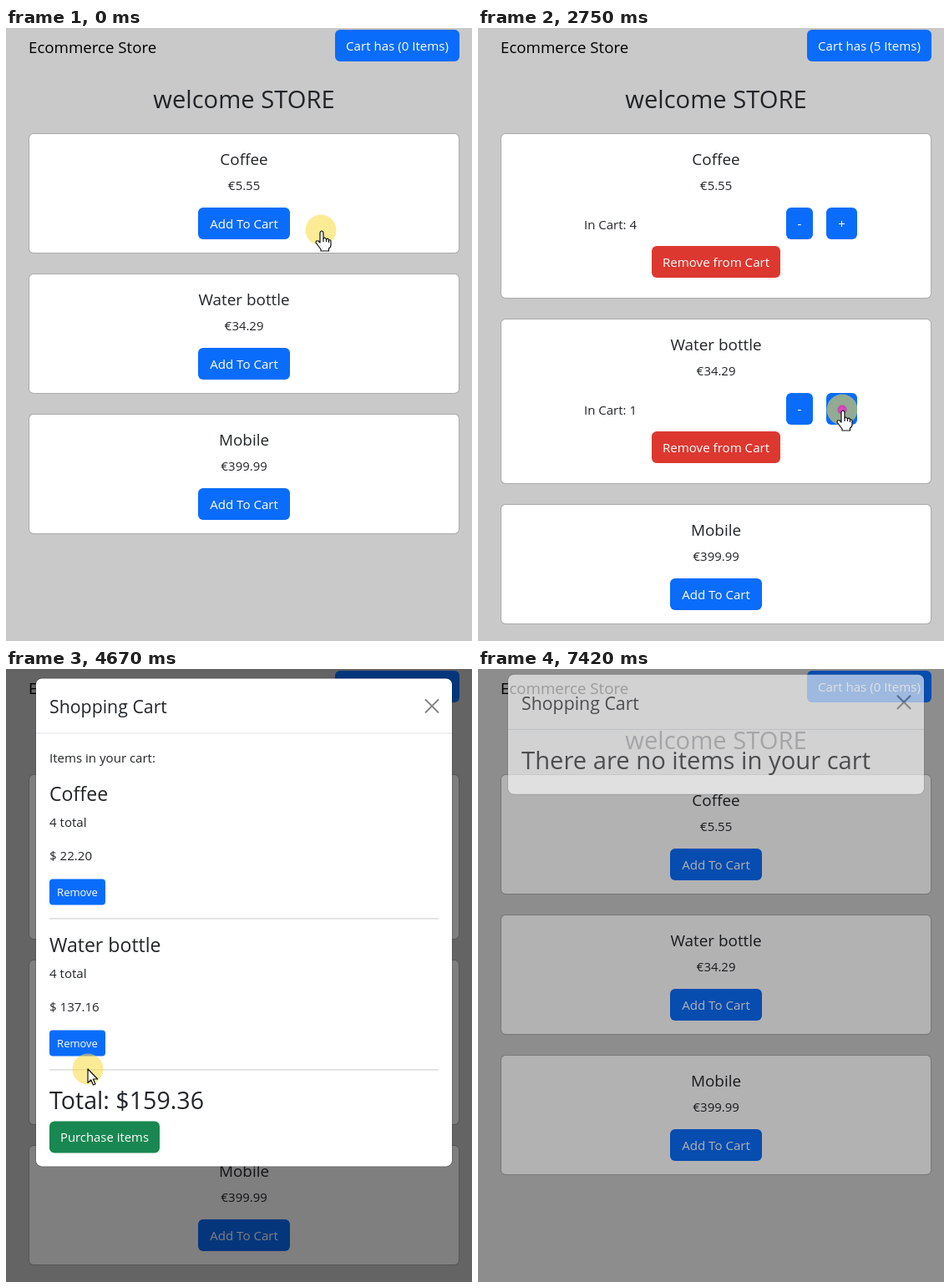
An HTML page with a canvas that plays this animation: 558 px wide and 734 px high, repeating every 7460 ms.

```html
<!DOCTYPE html>
<html lang="en">
<head>
<meta charset="utf-8">
<title>Ecommerce Store</title>
<style>
html, body { margin: 0; width: 100%; height: 100%; overflow: hidden; background: #c9c9c9; }
canvas { display: block; }
</style>
</head>
<body>
<canvas id="stage" width="558" height="734"></canvas>
<script>
const W = 558, H = 734, LOOP = 7460;
const stage = document.getElementById('stage');
const page = stage.getContext('2d');
const layer = document.createElement('canvas');
layer.width = W;
layer.height = H;
const modal = layer.getContext('2d');

const BG = '#c9c9c9', PANEL = '#fff', EDGE = 'rgba(0, 0, 0, .15)';
const INK = '#212529', TITLE = '#000', LABEL = '#fff';
const BLUE = '#0a6cfa', PRESSED = '#0a5dc4', RED = '#dc3830', GREEN = '#198751';
const RULE = '#c8c9ca', LINE = '#dee2e6', CLOSE = '#7f7f7f';

const PRODUCTS = [
  { name: 'Coffee', price: 5.55 },
  { name: 'Water bottle', price: 34.29 },
  { name: 'Mobile', price: 399.99 }
];

// time, coffee count, water count
const CART = [
  [0, 0, 0], [510, 1, 0], [1170, 2, 0], [1540, 3, 0], [1980, 4, 0],
  [2400, 4, 1], [2940, 4, 2], [3320, 4, 3], [3700, 4, 4],
  [5900, 0, 4], [6450, 0, 0]
];

// time, x, y of the pointer
const PATH = [
  [0, 377, 242], [260, 300, 238], [580, 300, 238], [860, 436, 236],
  [1700, 436, 236], [1880, 410, 401], [2100, 312, 456], [2330, 312, 456],
  [2580, 436, 457], [3560, 436, 457], [3750, 465, 44], [3880, 462, 26],
  [4250, 462, 26], [4670, 98, 479], [5150, 91, 273], [5700, 91, 273],
  [6020, 88, 274], [6330, 88, 274], [6840, 148, 510], [7150, 205, 770]
];
const CLICKS = [330, 980, 1340, 1690, 2210, 2740, 3120, 3560, 4150, 5590, 6200];
const HAND_SPANS = [[0, 1800], [2200, 2420], [2700, 3650], [3960, 4400], [5720, 6480]];
const OPEN_AT = 4490, CLOSE_AT = 7362, SLIDE = 300, FADE = 150;

const clamp = v => Math.min(1, Math.max(0, v));
const within = (t, a, b) => t >= a && t < b;

// cubic-bezier(0, 0, .58, 1)
function easeOut(p) {
  let lo = 0, hi = 1;
  for (let i = 0; i < 20; i++) {
    const u = (lo + hi) / 2;
    const x = 1.74 * u * u * (1 - u) + u * u * u;
    if (x < p) lo = u; else hi = u;
  }
  return lo * lo * (3 - 2 * lo);
}

function box(c, x, y, w, h, r, fill) {
  c.fillStyle = fill;
  c.beginPath();
  c.roundRect(x, y, w, h, r);
  c.fill();
}

function panel(c, x, y, w, h, r) {
  box(c, x - 1, y - 1, w + 2, h + 2, r + 1, EDGE);
  box(c, x, y, w, h, r, PANEL);
}

function text(c, str, x, y, size, fill = INK, align = 'left') {
  c.font = `${size}px "Open Sans", "Noto Sans", sans-serif`;
  c.textAlign = align;
  c.fillStyle = fill;
  c.fillText(str, x, y);
}

function button(c, label, x, y, w, fill, h = 38, size = 15.1) {
  box(c, x, y, w, h, h > 35 ? 6 : 4, fill);
  text(c, label, x + w / 2, Math.round(y + h / 2 + size * .43), size, LABEL, 'center');
}

function drawCard(product, y, count, state) {
  const h = count ? 196 : 142;
  panel(page, 28, y, 514, h, 5);
  text(page, product.name, 285, y + 37, 18.9, INK, 'center');
  text(page, '€' + product.price, 285, y + 67, 14.9, INK, 'center');
  if (count) {
    text(page, 'In Cart: ' + count, 127, y + 114, 15);
    button(page, '-', 369, y + 88, 32, BLUE);
    button(page, '+', 417, y + 88, 37, state.plus ? PRESSED : BLUE);
    button(page, 'Remove from Cart', 208, y + 134, 154, RED);
  } else {
    button(page, 'Add To Cart', 230, y + 88, 110, state.add ? PRESSED : BLUE);
  }
  return y + h + 26;
}

function drawPage(t, counts) {
  page.fillStyle = BG;
  page.fillRect(0, 0, W, H);
  text(page, 'Ecommerce Store', 27, 30, 18.7, TITLE);
  const cartHover = within(t, 3980, OPEN_AT);
  button(page, `Cart has (${counts[0] + counts[1]} Items)`, 394, 2, 149,
    cartHover ? PRESSED : BLUE);
  text(page, 'welcome STORE', 285, 95.5, 29.15, INK, 'center');
  const states = [
    { add: within(t, 340, 510), plus: within(t, 1000, 2300) },
    { add: within(t, 2250, 2400), plus: within(t, 2760, 4300) },
    {}
  ];
  let y = 127;
  PRODUCTS.forEach((p, i) => { y = drawCard(p, y, counts[i] || 0, states[i]); });
}

function drawModal(t, counts, top) {
  const c = modal;
  const items = PRODUCTS.map((p, i) => ({ ...p, count: counts[i] || 0 })).filter(p => p.count);
  const height = items.length ? 222 + 181 * items.length : 143;
  c.clearRect(0, 0, W, H);
  c.save();
  c.translate(0, top);
  panel(c, 36, 0, 498, height, 7);
  text(c, 'Shopping Cart', 52, 42, 21.3);
  c.fillStyle = LINE;
  c.fillRect(36, 65, 498, 1);
  c.strokeStyle = CLOSE;
  c.lineWidth = 2;
  c.lineCap = 'round';
  c.beginPath();
  c.moveTo(502.5, 25.5); c.lineTo(517.5, 40.5);
  c.moveTo(517.5, 25.5); c.lineTo(502.5, 40.5);
  c.stroke();

  if (!items.length) {
    text(c, 'There are no items in your cart', 52, 113, 29.2);
  } else {
    text(c, 'Items in your cart:', 52, 101, 15.05);
    let total = 0;
    const hover = within(t, 5740, 5900) || within(t, 6020, 6450);
    items.forEach((item, i) => {
      const y = 181 * i, cost = item.count * item.price;
      total += cost;
      text(c, item.name, 52, y + 147, 23.1);
      text(c, item.count + ' total', 52, y + 178, 15.1);
      text(c, '$ ' + cost.toFixed(2), 52, y + 218, 15.1);
      button(c, 'Remove', 52, y + 240, 67, hover && !i ? PRESSED : BLUE, 31, 13);
      c.fillStyle = RULE;
      c.fillRect(52, y + 287, 466, 1);
    });
    const y = 181 * items.length;
    text(c, 'Total: $' + total.toFixed(2), 52, y + 154, 28.6);
    button(c, 'Purchase items', 52, y + 168, 132, GREEN, 38, 14.9);
  }
  c.restore();
}

function pointerAt(t) {
  const i = PATH.findIndex(k => k[0] > t);
  if (i < 0) return PATH[PATH.length - 1].slice(1);
  const [t0, x0, y0] = PATH[i - 1], [t1, x1, y1] = PATH[i];
  const p = (t - t0) / (t1 - t0), e = p * p * (3 - 2 * p);
  return [x0 + (x1 - x0) * e, y0 + (y1 - y0) * e];
}

function drawPointer(t) {
  const [x, y] = pointerAt(t);
  const c = page;
  c.save();
  c.translate(x, y);
  c.fillStyle = 'rgba(250, 220, 70, .57)';
  c.beginPath();
  c.arc(0, 0, 18.5, 0, 7);
  c.fill();

  const click = CLICKS.find(k => within(t, k, k + 230));
  if (click !== undefined) {
    const p = (t - click) / 230;
    c.strokeStyle = `rgba(215, 50, 190, ${.85 * (1 - .8 * p)})`;
    c.lineWidth = 6 - 3 * p;
    c.beginPath();
    c.arc(0, 0, 2 + 15.5 * p, 0, 7);
    c.stroke();
  }

  const hand = HAND_SPANS.some(([a, b]) => within(t, a, b));
  const shape = new Path2D(hand
    ? 'M-1 3Q1-1 3 3V10Q5 8 6.500 11Q9 9 9.500 12Q12 11 12 14V18Q12 21 9.500 22V25H0V23L-6 15Q-6 12-3 13L-1 15Z'
    : 'M0 0V16.500L3.800 13L6.500 19L9 18L6.400 12H11.700Z');
  c.lineJoin = 'round';
  c.lineWidth = 1.2;
  c.strokeStyle = '#111';
  c.fillStyle = '#fff';
  c.fill(shape);
  c.stroke(shape);
  if (hand) c.stroke(new Path2D('M3 10V14M6.500 11V14M9.500 12V15'));
  c.restore();
}

function render(t) {
  const [, ...counts] = CART.filter(k => k[0] <= t).pop();
  const shown = clamp((t - OPEN_AT) / FADE) - clamp((t - CLOSE_AT) / FADE);
  drawPage(t, counts);
  if (shown > 0) {
    const slide = easeOut(clamp((t - OPEN_AT) / SLIDE)) - easeOut(clamp((t - CLOSE_AT) / SLIDE));
    page.fillStyle = `rgba(0, 0, 0, ${.5 * shown})`;
    page.fillRect(0, 0, W, H);
    drawModal(t, counts, 22 - 50 * (1 - slide));
    page.globalAlpha = shown;
    page.drawImage(layer, 0, 0);
    page.globalAlpha = 1;
  }
  drawPointer(t);
}

const start = performance.now();
function tick() {
  render((performance.now() - start) % LOOP);
  requestAnimationFrame(tick);
}
tick();
</script>
</body>
</html>
```
